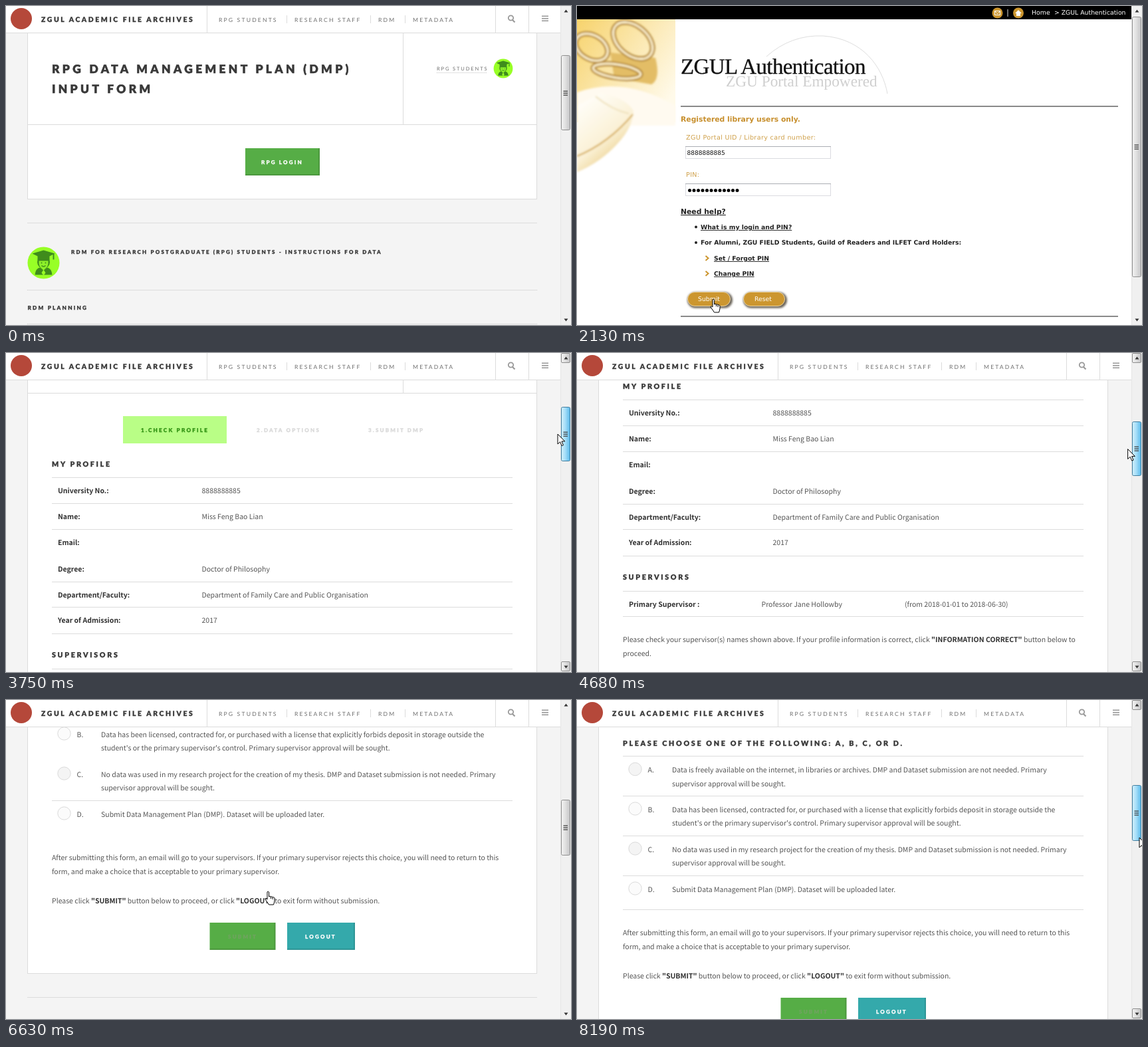
These frames come from a looping animation (850 px wide and 480 px high, 8280 ms). An HTML page:

```html
<!DOCTYPE html>
<html lang="en">
<head>
<meta charset="utf-8">
<title>Data plan walkthrough</title>
<style>
html, body { margin: 0; width: 100%; height: 100%; overflow: hidden; background: #f4f4f4; }
svg { display: block; width: 850px; height: 480px; }
text { white-space: pre; text-rendering: geometricPrecision; fill: currentColor; }
.head { font: 900 10.7px Lato, sans-serif; letter-spacing: .25em; color: #383838; stroke: currentColor; stroke-width: .03em; }
.tag { font: 900 8.2px Lato, sans-serif; letter-spacing: 2.2px; color: #383838; stroke: currentColor; stroke-width: .25px; }
.nav { font: 400 8.6px Lato, sans-serif; letter-spacing: .25em; color: #707070; }
.body { font: 400 10.5px "Noto Sans CJK SC", "Noto Sans CJK JP", "Noto Sans", sans-serif; color: #555; }
.bold, .body tspan { font-weight: 700; color: #303030; fill: #303030; }
.ui { font: 400 9.3px "DejaVu Sans", sans-serif; color: #111; }
.label { letter-spacing: .35px; }
.uib { font: 700 9.3px "DejaVu Sans", sans-serif; color: #222; }
.link { text-decoration: underline; }
.serif { font-family: "Liberation Serif", serif; }
.tight { letter-spacing: -.6px; stroke: currentColor; stroke-width: .3px; }
.rule { stroke: #dcdcdc; }
.dots { stroke: #c4c4c4; stroke-dasharray: 1 1; }
.card { fill: #fff; stroke: #dcdcdc; }
</style>
</head>
<body>
<svg id="stage" viewBox="0 0 850 480"></svg>
<script>
const LOOP = 8280;
const GREEN = '#56ad46', TEAL = '#34a9ab', GOLD = '#cc962f';
const UID = '8888888885';

const text = (cls, x, y, s, size, color) =>
  `<text class="${cls}" x="${x}" y="${y}" style="${size ? `font-size:${size}px;` : ''}${color ? `color:${color}` : ''}">${s}</text>`;
const box = (x, y, w, h, fill, more = '') =>
  `<rect x="${x}" y="${y}" width="${w}" height="${h}" fill="${fill}" ${more}/>`;
const hline = (x1, x2, y, cls = 'rule') =>
  `<line class="${cls}" x1="${x1}" x2="${x2}" y1="${y + .5}" y2="${y + .5}"/>`;
const vline = (x, y1, y2) => `<line class="rule" x1="${x}" x2="${x}" y1="${y1}" y2="${y2}"/>`;
const circle = (x, y, r, fill, more = '') => `<circle cx="${x}" cy="${y}" r="${r}" fill="${fill}" ${more}/>`;
const path = (d, fill, more = '') => `<path d="${d}" fill="${fill}" ${more}/>`;
const group = (id, inner, more = '') => `<g id="${id}" ${more}>${inner}</g>`;
const button = (x, y, w, h, fill, tx, label, ink = '#fff', id = '') =>
  box(x, y, w, h, fill, id && `id="${id}"`) +
  path(`M${x} ${y + h - 1}h${w - 1}v${1 - h}`, 'none', 'stroke="#000" stroke-opacity=".12" stroke-width="2"') +
  text('tag', tx, y + h / 2 + 3, label, 8, ink);

const defs = `<defs>
<linearGradient id="gray"><stop offset="0" stop-color="#f4f4f4"/><stop offset=".5" stop-color="#dedede"/><stop offset="1" stop-color="#c4c4c6"/></linearGradient>
<linearGradient id="blue"><stop offset="0" stop-color="#d4f1fd"/><stop offset=".45" stop-color="#a5def8"/><stop offset="1" stop-color="#58b8ea"/></linearGradient>
<linearGradient id="glow" x2="1" y2=".7"><stop offset="0" stop-color="#f7d36c"/><stop offset=".5" stop-color="#fbe7ae"/><stop offset="1" stop-color="#fffaea"/></linearGradient>
<linearGradient id="mouse" x1=".2" x2=".8" y2="1"><stop offset="0" stop-color="#fffefa"/><stop offset=".55" stop-color="#fbf1d6"/><stop offset="1" stop-color="#e2bd66"/></linearGradient>
<filter id="soft"><feGaussianBlur stdDeviation="1.6"/></filter>
<filter id="shade"><feGaussianBlur stdDeviation="1.5"/></filter></defs>`;

// Graduate badge drawn around its centre
const badge = (x, y, k) => `<g transform="translate(${x} ${y}) scale(${k})">` +
  circle(0, 0, 24, '#98ff26') +
  path('M-13 18Q-12 8-5 7L0 11 5 7Q12 8 13 18Z', '#3f8c1c') +
  circle(0, -1, 9.5, '#3f8c1c') + path('M-7-3H7Q8 8 0 9Q-8 8-7-3Z', '#8df02a') +
  path('M-3 4Q0 7 3 4', 'none', 'stroke="#3f8c1c" stroke-width="1.5"') +
  circle(-3, 0, 1, '#3f8c1c') + circle(3, 0, 1, '#3f8c1c') +
  path('M-17-14L0-19 17-14 9-10V-4H-9V-10Z', '#3f8c1c') +
  path('M15-14V-5', 'none', 'stroke="#3f8c1c" stroke-width="2"') +
  path('M0 10L3 15 0 19-3 15Z', '#98ff26') + '</g>';

// Card heading; y is the line under it
const planHead = y => hline(33, 798, y) + vline(597.5, y - 143, y) +
  text('head', 69, y - 77, 'RPG DATA MANAGEMENT PLAN (DMP)', 17.4) +
  text('head', 69, y - 47, 'INPUT FORM', 17.4) +
  text('nav', 648, y - 81, 'RPG STUDENTS', 7.5) + hline(648, 723, y - 78, 'dots') +
  badge(748, y - 84, .6);

const login = group('login',
  `<rect class="card" x="32.5" y="35.5" width="766" height="255"/>` + planHead(178) +
  button(360, 214, 112, 41, GREEN, 384, 'RPG LOGIN') +
  hline(32, 799, 326) + badge(56.5, 386.5, 1) +
  text('tag', 98, 373, 'RDM FOR RESEARCH POSTGRADUATE (RPG) STUDENTS - INSTRUCTIONS FOR DATA', 8) +
  hline(32, 799, 427, 'dots') + text('tag', 32.5, 457, 'RDM PLANNING') + hline(32, 799, 478, 'dots'));

const profile = [
  ['University No.:', UID, 556.5], ['Name:', 'Miss Feng Bao Lian', 596], ['Email:', '', 635],
  ['Degree:', 'Doctor of Philosophy', 674.5],
  ['Department/Faculty:', 'Department of Family Care and Public Organisation', 713.5],
  ['Year of Admission:', '2017', 752]];
const hex = 'M416 80L440 94V120L416 134 392 120V94Z';
const form = group('form',
  path(hex, '#d8cbb5') + path('M392 100L408 108 404 127 392 120Z', '#b08a5c') +
  path('M424 112L440 104V120L426 128Z', '#9a856f') + path('M404 114L420 106 426 118 412 126Z', '#f0ebe2') +
  path('M404 127L416 121 428 127 416 134Z', '#8f8a88') +
  text('head', 198, 180.5, 'ACADEMIC FILE ARCHIVES', 23.9) +
  text('nav', 290, 220, 'THE UNIVERSITY OF ZORM GALD LIBRARIES', 8.5) + hline(290, 541, 223, 'dots') +
  `<rect class="card" x="32.5" y="262.5" width="766" height="889"/>` + planHead(406) +
  box(176, 441, 156, 41, '#b9fe86') + text('tag', 203, 465, '1.CHECK PROFILE', 0, '#339415') +
  text('tag', 377, 465, '2.DATA OPTIONS', 8, '#d9d9d9') + text('tag', 545, 465, '3.SUBMIT DMP', 8, '#d9d9d9') +
  text('head', 69, 516.5, 'MY PROFILE') +
  [533, 572, 611, 690, 728, 768].map(y => hline(69, 762, y)).join('') +
  profile.map(([k, v, y]) => text('body bold', 78, y, k) + text('body', 294.5, y, v)).join('') +
  text('head', 69, 803.5, 'SUPERVISORS') + hline(69, 762, 821) + hline(69, 762, 859) +
  text('body bold', 78, 844.5, 'Primary Supervisor :') + text('body', 277.5, 844.5, 'Professor Jane Hollowby') +
  text('body', 493, 844.5, '(from 2018-01-01 to 2018-06-30)') +
  text('body', 69, 898, 'Please check your supervisor(s) names shown above. If your profile information is correct, click <tspan>"INFORMATION CORRECT"</tspan> button below to') +
  text('body', 69, 919, 'proceed.') +
  button(319.5, 949, 192, 39.5, GREEN, 347, 'INFORMATION CORRECT', '#fff', 'confirm') +
  text('body', 69, 1026, 'If you found any incorrect information in your profile record, please click the <tspan>"LOGOUT"</tspan> button below to exit form and contact your') +
  text('body', 69, 1047, 'department/faculty to correct your record.') +
  button(365, 1077, 101.5, 39.5, TEAL, 392, 'LOGOUT'));

const choices = [
  ['A.', -4, 'Data is freely available on the internet, in libraries or archives. DMP and Dataset submission are not needed. Primary', 'supervisor approval will be sought.'],
  ['B.', 55.5, 'Data has been licensed, contracted for, or purchased with a license that explicitly forbids deposit in storage outside the', "student's or the primary supervisor's control. Primary supervisor approval will be sought."],
  ['C.', 115.5, 'No data was used in my research project for the creation of my thesis. DMP and Dataset submission is not needed. Primary', 'supervisor approval will be sought.'],
  ['D.', 175.5, 'Submit Data Management Plan (DMP). Dataset will be uploaded later.', '']];
const options = group('options',
  `<rect class="card" x="32.5" y="-400" width="766" height="811.5"/>` +
  text('head', 69, -44.5, 'PLEASE CHOOSE ONE OF THE FOLLOWING: A, B, C, OR D.') + hline(69, 762, 151) +
  group('rules', [-29, 31, 91, 202].map(y => hline(69, 762, y)).join('')) +
  choices.map(([k, y, a, b]) => circle(87.5, y - 5, 9.7, k < 'D' && k !== 'B.' ? '#f4f4f4' : '#fbfbfb', 'stroke="#dadada"') +
    text('body', 106.5, y, k) + text('body', 143, y, a) + text('body', 143, y + 20.8, b)).join('') +
  text('body', 69, 241, 'After submitting this form, an email will go to your supervisors. If your primary supervisor rejects this choice, you will need to return to this') +
  text('body', 69, 261.5, 'form, and make a choice that is acceptable to your primary supervisor.') +
  text('body', 69, 305.5, 'Please click <tspan>"SUBMIT"</tspan> button below to proceed, or click <tspan>"LOGOUT"</tspan> to exit form without submission.') +
  button(306.5, 335, 99, 41, GREEN, 334, 'SUBMIT', '#6fa45f') + button(423, 335, 102, 41, TEAL, 450, 'LOGOUT') +
  hline(32, 799, 447));

const header = group('header',
  box(0, 0, 835, 40, '#fff') + hline(0, 835, 40) + circle(23, 19, 16, '#b5483a') +
  text('head', 53, 24, 'ZGUL ACADEMIC FILE ARCHIVES', 10.4) +
  [302.5, 736.5, 786.5].map(x => vline(x, 0, 40)).join('') + [422.5, 548.5, 600.5].map(x => vline(x, 14, 26)).join('') +
  text('nav', 320, 24, 'RPG STUDENTS') + text('nav', 434, 24, 'RESEARCH STAFF') +
  text('nav', 560, 24, 'RDM') + text('nav', 612, 24, 'METADATA') +
  circle(759.5, 18, 3.7, 'none', 'stroke="#999" stroke-width="1.8"') +
  path('M762 21L765.5 24.5', 'none', 'stroke="#999" stroke-width="2.2"') +
  [14.5, 18, 21.5].map(y => box(806, y, 10, 1.6, '#999')).join(''));

const pill = (x, w, tx, label) =>
  box(x, 430.5, w + 3, 24, '#6b6458', 'rx="12" filter="url(#shade)"') +
  box(x + .5, 430.5, w - 1, 21, GOLD, 'rx="10.5" stroke="#ead5a4"') + text('ui', tx, 444, label, 9.3, '#fff');
const field = y => box(163.5, y + .5, 218, 18, '#fff', 'stroke="#dadbe0"') + box(163, y, 219, 1, '#abadb3');

// Soft stand-in for the banner picture: chain, padlock and mouse
const ring = (x, y, rx, ry, turn) => [['#b58a38', 8], ['#fff4d2', 3]].map(([c, w]) =>
  `<ellipse cx="${x}" cy="${y}" rx="${rx}" ry="${ry}" transform="rotate(${turn} ${x} ${y})" fill="none" stroke="${c}" stroke-width="${w}"/>`).join('');
const picture = box(0, 20, 148, 155, 'url(#glow)') +
  `<g filter="url(#soft)">` +
  path('M0 130Q70 105 148 150V180H80Q40 150 0 160Z', '#fffaf0') +
  path('M50 70L118 78Q126 110 112 118L56 108Z', '#e3bd66') +
  ring(22, 62, 26, 18, 30) + ring(84, 52, 34, 22, 40) + ring(60, 98, 36, 10, 8) +
  path('M0 150L36 131Q74 138 85 158Q84 182 62 206Q36 235 0 250Z', 'url(#mouse)') +
  path('M0 226Q48 206 84 163', 'none', 'stroke="#d3a94e" stroke-width="2"') +
  path('M28 136Q52 156 78 162', 'none', 'stroke="#eedfb8" stroke-width="2"') + '</g>';

const auth = group('auth',
  box(0, 0, 835, 480, '#fff') + picture +
  path('M285 76Q322 43 370 45C430 49 460 92 467 132', 'none', 'stroke="#dedede"') +
  text('serif', 224, 121, 'ZGU Portal Empowered', 23.3, '#cfcfcf') +
  text('serif tight', 156, 102, 'ZGUL Authentication', 33, '#111') +
  box(0, 0, 835, 20, '#000') + circle(632.5, 10.5, 8, GOLD) + circle(664, 10.5, 8, GOLD) +
  box(628.5, 7.5, 8, 6, 'none', 'stroke="#fff"') + path('M628.5 8L632.5 11.5 636.5 8', 'none', 'stroke="#fff"') +
  path('M659 11L664 6 669 11H667V15H661V11Z', '#fff') + box(647.5, 5, 1, 11, '#ddd') +
  text('ui', 684, 13, 'Home', 9.4, '#fff') + text('ui', 718, 13, '&gt; ZGUL Authentication', 9.3, '#fff') +
  box(156, 150, 658, 2, '#8a8a8a') + box(156, 466, 658, 2, '#8a8a8a') +
  text('uib', 156, 174, 'Registered library users only.', 10.8, '#c78f2d') +
  text('ui label', 164, 200.5, 'ZGU Portal UID / Library card number:', 9.6, '#cfa04a') + field(211) +
  text('ui label', 164, 257, 'PIN:', 9.6, '#cfa04a') + field(267) +
  `<text id="uid" class="ui" x="165.5" y="224" style="font-size:9px"></text>` + box(221, 214, 1, 13, '#000', 'id="caret"') +
  group('pin', Array.from({ length: 12 }, (_, i) => circle(169.5 + i * 6.5, 277.5, 2.5, '#000')).join('')) +
  text('uib link', 156, 313, 'Need help?', 10.8) +
  circle(179, 332.5, 2, '#222') + circle(179, 356, 2, '#222') +
  text('uib link', 186, 336, 'What is my login and PIN?') +
  text('uib', 186, 359, 'For Alumni, ZGU FIELD Students, Guild of Readers and ILFET Card Holders:') +
  text('uib link', 206, 383, 'Set / Forgot PIN') +
  text('uib link', 206, 406, 'Change PIN') +
  [379.5, 402.5].map(y => path(`M193.5 ${y - 3.5}L197.5 ${y} 193.5 ${y + 3.5}`, 'none', `stroke="${GOLD}" stroke-width="2"`)).join('') +
  pill(166, 65, 182, 'Submit') + pill(250, 63, 267, 'Reset'));

const bar = group('bar',
  box(834, 0, 16, 480, '#f0f0f0') + box(834, 0, 1, 480, '#e6e6e6') +
  group('ends', [.5, 464.5].map(y => box(835.5, y, 13, 14, 'url(#gray)', 'rx="1.5" stroke="#8e8e8e"')).join('')) +
  path('M839.5 9.5L842.5 5.5 845.5 9.5Z', '#333') + path('M839.5 470.5L842.5 474.5 845.5 470.5Z', '#333') +
  box(835.5, 0, 13, 10, '', 'id="thumb" rx="2"') +
  group('grip', [-3, 0, 3].map(y => box(838.5, y - .5, 6.5, 1.3, '#444')).join('')));

const ink = 'stroke="#000" stroke-linejoin="round"';
const cursor = group('arrow', path('M0 0V15L3.6 11.7 6.2 17.6 8.5 16.6 6 10.9H10.8Z', '#fff', ink)) +
  group('hand', path('M-1 1Q0-1 1.6 1V8Q3 6.4 4.4 8Q6 7 7 8.8Q9 8 10 10V14Q9.6 17 8.5 20H1.5Q-1 16-4 12Q-4 9.5-1 12Z', '#fff', ink) +
    path('M4.4 8V11M7 9V12', 'none', 'stroke="#000"'));

document.getElementById('stage').innerHTML = defs + box(0, 0, 850, 480, '#f4f4f4') +
  login + form + options + header + auth + bar + cursor;

const el = id => document.getElementById(id);
const show = (id, on) => { el(id).style.display = on ? '' : 'none'; };
const clamp = v => Math.max(0, Math.min(1, v));
const move = (id, x, y) => el(id).setAttribute('transform', `translate(${x} ${y})`);
const smooth = p => p * p * (3 - 2 * p);

// Rows are [time, ...values]
function track(rows, t, ease = p => p) {
  let i = 0;
  while (i < rows.length - 2 && t >= rows[i + 1][0]) i++;
  const a = rows[i], b = rows[i + 1], p = ease(clamp((t - a[0]) / (b[0] - a[0])));
  return a.slice(1).map((v, k) => v + (b[k + 1] - v) * p);
}

const CUT = { auth: 60, form: 2220, options: 6630 };
const formScroll = [[3000, 0], [3180, 73], [3750, 346], [3900, 372], [4470, 372], [5100, 644], [5370, 700]];
const optionScroll = [[7470, 0], [7770, 113]];
const toSubmit = [[1860, 300, 330], [2070, 205, 441]];
const toBar = [[2370, 205, 441], [2970, 838, 55]];
const dragX = [[3000, 838], [3180, 836], [3750, 830], [5100, 828], [5370, 828]];
const toConfirm = [[5580, 828, 190], [6120, 394, 288]];
const backToBar = [[6660, 394, 288], [7410, 840, 192]];
const leave = [[8070, 840, 170], [8190, 846, 207]];

function pointer(t, thumb) {
  if (t < 1860) return null;
  if (t < CUT.form) return track(toSubmit, t, smooth);
  if (t < 3000) return track(toBar, t, smooth);
  if (t < 5580) return [track(dragX, t)[0], thumb + 41.5];
  if (t < CUT.options) return track(toConfirm, t, smooth);
  if (t < 7470) return track(backToBar, t, smooth);
  if (t < 8070) return [840, thumb + 42];
  return track(leave, t);
}

function draw(t) {
  const page = t < CUT.auth ? 'login' : t < CUT.form ? 'auth' : t < CUT.options ? 'form' : 'options';
  for (const p of ['login', 'auth', 'form', 'options']) show(p, p === page);
  show('header', page !== 'auth');

  const s = track(formScroll, t)[0], o = track(optionScroll, t)[0];
  move('form', 0, -Math.round(s));
  move('options', 0, Math.round(o));
  show('rules', t >= 6900);

  el('uid').textContent = UID.slice(0, Math.floor(clamp((t - 330) / 450) * 10));
  show('caret', t >= 780 && t < 1050);
  const typed = Math.floor(clamp((t - 1530) / 330) * 12);
  [...el('pin').children].forEach((c, i) => { c.style.display = i < typed ? '' : 'none'; });

  const [top, size] = { login: [74, 113], auth: [16, 392], form: [28 + (s - 73) / 5.2, 82], options: [150 - o / 5.14, 84] }[page];
  const live = (t >= 2930 && t < 5640) || t >= 7380;
  const thumb = el('thumb');
  thumb.setAttribute('y', Math.round(top) + .5);
  thumb.setAttribute('height', size - 1);
  thumb.setAttribute('fill', live ? 'url(#blue)' : 'url(#gray)');
  thumb.setAttribute('stroke', live ? '#3f7d9f' : '#8e8e8e');
  move('grip', 0, Math.round(top + size / 2));
  show('ends', live);

  const at = pointer(t, top);
  const onLink = (t >= 2010 && t < CUT.form) || (t >= 6060 && t < 6720);
  show('hand', at && onLink);
  show('arrow', at && !onLink);
  if (at) { move('hand', ...at); move('arrow', ...at); }
  el('confirm').setAttribute('fill', t >= 6060 ? '#63b954' : GREEN);
}

const start = performance.now();
function tick() {
  draw((performance.now() - start) % LOOP);
  requestAnimationFrame(tick);
}
tick();
</script>
</body>
</html>
```
